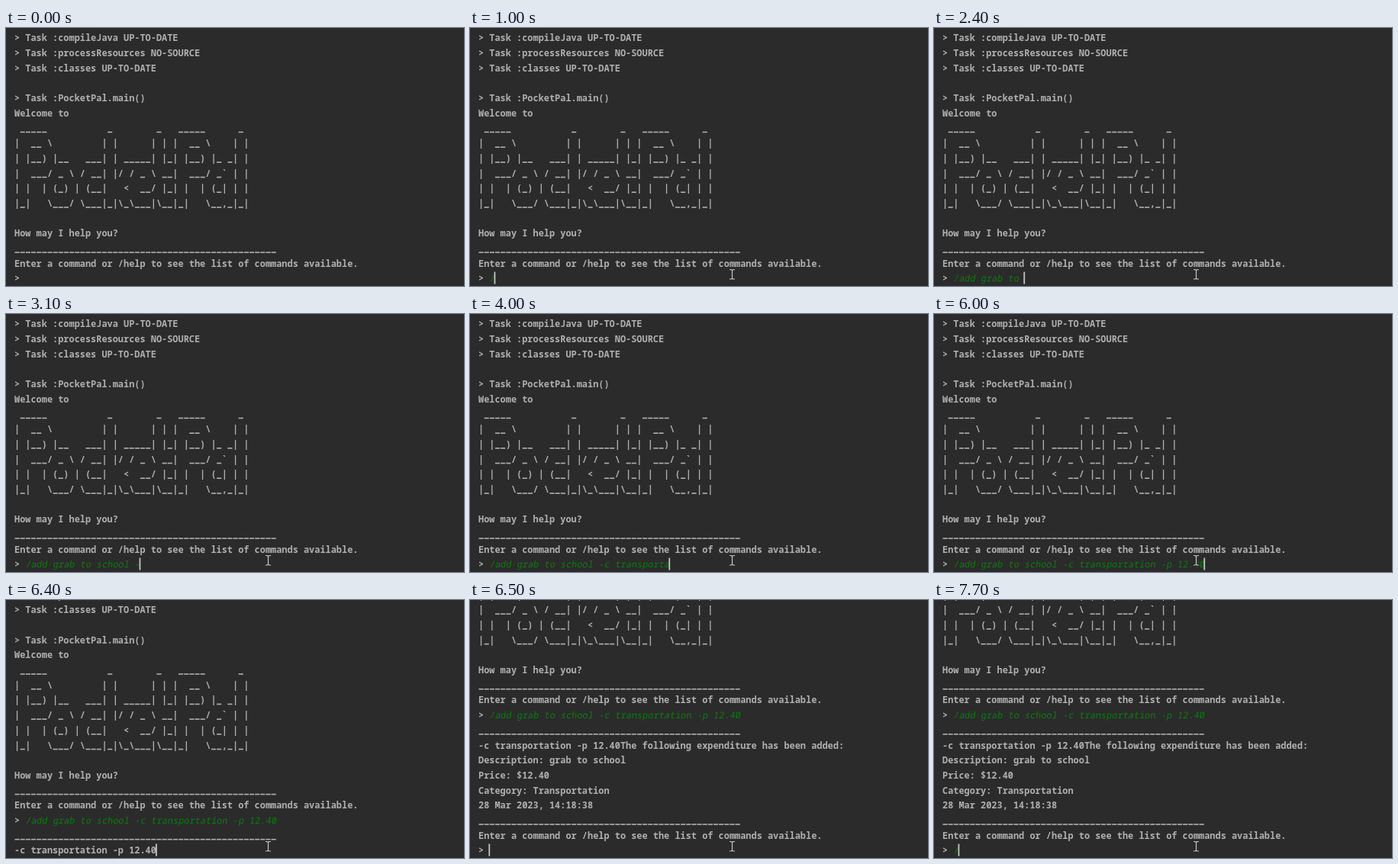
Recreate the animation shown at these times as an HTML page with a canvas. Size 600 by 338 pixels, loop 8 s.

```html
<!DOCTYPE html>
<html lang="en">
<head>
<meta charset="utf-8">
<title>Console session</title>
<style>
  html, body { margin: 0; width: 100%; height: 100%; overflow: hidden; background: #2b2b2b; }
  canvas { display: block; width: 600px; height: 338px; }
</style>
</head>
<body>
<canvas id="stage" width="600" height="338"></canvas>
<script>
const ctx = document.getElementById('stage').getContext('2d');
const LOOP = 8000, TICK = 100;
const LEFT = 11, CELL = 7.15, PITCH = 19.69, BASE = 17.3, ROWS = 17;
const BG = '#2b2b2b', TEXT = '#b0b0b0', INPUT = '#087f0c';
const FONT = '11.9px "Noto Sans Mono", "DejaVu Sans Mono", monospace';

const RULE = '_'.repeat(48);
const ASK = 'Enter a command or /help to see the list of commands available.';
const ECHO = '-c transportation -p 12.40';

const intro = [
  '> Task :compileJava UP-TO-DATE',
  '> Task :processResources NO-SOURCE',
  '> Task :classes UP-TO-DATE',
  '',
  '> Task :PocketPal.main()',
  'Welcome to',
  ' _____           _        _   _____      _ ',
  '|  __ \\         | |      | | |  __ \\    | |',
  '| |__) |__   ___| | _____| |_| |__) |_ _| |',
  '|  ___/ _ \\ / __| |/ / _ \\ __|  ___/ _` | |',
  '| |  | (_) | (__|   <  __/ |_| |  | (_| | |',
  '|_|   \\___/ \\___|_|\\_\\___|\\__|_|   \\__,_|_|',
  '',
  'How may I help you?',
  RULE,
  ASK
];

const reply = [
  RULE,
  ECHO + 'The following expenditure has been added:',
  'Description: grab to school',
  'Price: $12.40',
  'Category: Transportation',
  '28 Mar 2023, 14:18:38',
  RULE,
  ASK
];

// Each burst is typed evenly from its first key to its last
const bursts = [
  { text: '/', from: 800, to: 800 },
  { text: 'a', from: 1300, to: 1300 },
  { text: 'dd ', from: 1500, to: 1600 },
  { text: 'grab to ', from: 2000, to: 2400 },
  { text: 'school -', from: 2500, to: 3100 },
  { text: 'c transportation', from: 3400, to: 4200 },
  { text: ' -', from: 4300, to: 4400 },
  { text: 'p ', from: 4600, to: 4700 },
  { text: '12', from: 5200, to: 5300 },
  { text: '.', from: 5600, to: 5600 },
  { text: '40', from: 5900, to: 6000 }
];

// Spans in which the caret is hidden
const caretOff = [[0, 200], [500, 700], [1200, 1300], [5000, 5200], [6700, 7000], [7200, 7500]];

function typedPart({ text, from, to }, t) {
  if (t < from) return '';
  if (t >= to) return text;
  return text.slice(0, 1 + Math.round((text.length - 1) * (t - from) / (to - from)));
}

const commandAt = t => bursts.map(b => typedPart(b, t)).join('');
const prompt = typed => ({ text: '> ', typed });

function linesAt(t) {
  const sent = [...intro, prompt(commandAt(t))];
  if (t < 6200) return sent;
  if (t < 6400) return [...sent, ''];
  if (t < 6500) return [...sent, RULE, ECHO];
  return [...sent, ...reply, prompt(t < 7700 ? '' : '/')];
}

function drawText(text, col, y, color, weight, slant = 0) {
  ctx.fillStyle = color;
  ctx.font = `${weight} ${FONT}`;
  [...text].forEach((ch, i) => {
    const x = LEFT + (col + i) * CELL;
    if (ch === '_') {
      ctx.fillRect(x + 0.5, y + 0.2, CELL - 1, 1.6);
    } else if (ch !== ' ') {
      ctx.save();
      ctx.transform(1, 0, -slant, 1, x, y);
      ctx.fillText(ch, 0, 0);
      ctx.restore();
    }
  });
}

function drawPointer() {
  const beam = new Path2D('M340 316.5H342.2L343.5 317.5L344.8 316.5H347M343.5 317.5V328M340 329H342.2L343.5 328L344.8 329H347');
  ctx.strokeStyle = BG;
  ctx.lineWidth = 3.5;
  ctx.stroke(beam);
  ctx.strokeStyle = '#c8c8c8';
  ctx.lineWidth = 1.2;
  ctx.stroke(beam);
}

function draw(t) {
  ctx.fillStyle = BG;
  ctx.fillRect(0, 0, 600, 338);

  const lines = linesAt(t);
  const top = lines.length - ROWS;
  let end = 0;
  lines.forEach((line, i) => {
    const y = BASE + (i - top) * PITCH;
    const { text, typed } = line.text ? line : { text: line, typed: '' };
    drawText(text, 0, y, TEXT, 600);
    drawText(typed, text.length, y, INPUT, 500, 0.17);
    end = text.length + typed.length;
  });

  if (!caretOff.some(([from, to]) => t >= from && t < to)) {
    ctx.fillStyle = '#c4c4c4';
    ctx.fillRect(LEFT + end * CELL - 0.9, 319.5, 1.8, 16);
  }
  if (t >= 300) drawPointer();
}

function frame() {
  const t = performance.now() % LOOP;
  draw(Math.floor(t / TICK) * TICK);
  requestAnimationFrame(frame);
}
frame();
</script>
</body>
</html>
```
